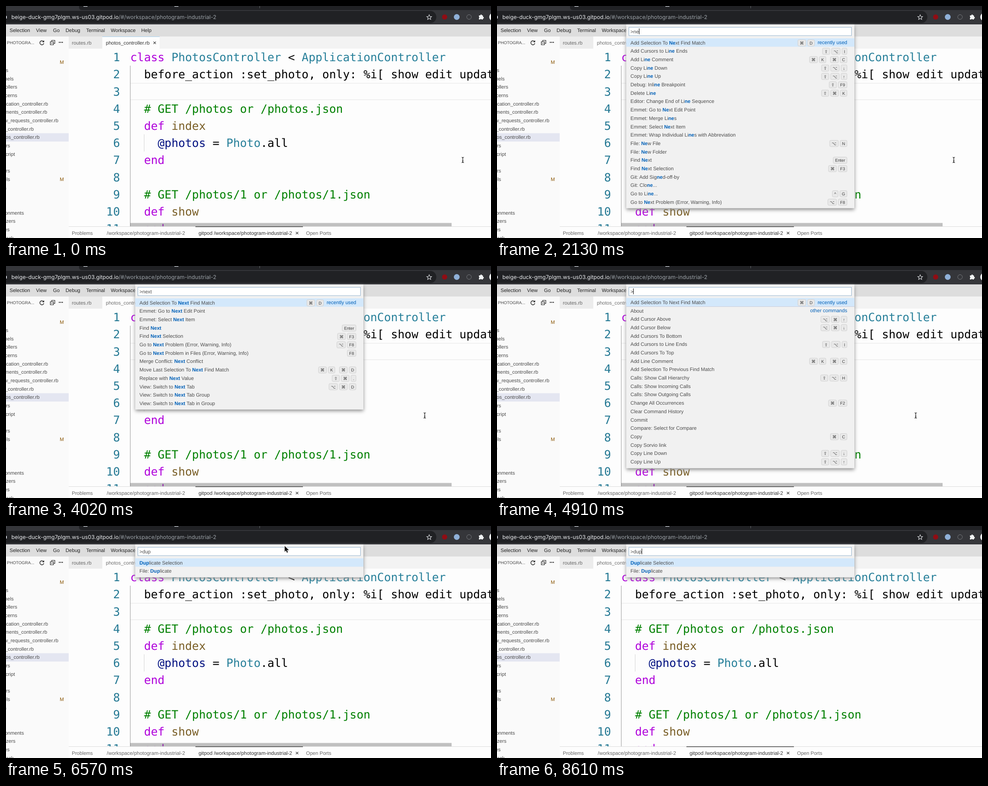
An HTML page with a canvas that plays this animation: 1083x517 px, repeating every 8.85 s.

```html
<!DOCTYPE html>
<html lang="en">
<head>
<meta charset="utf-8">
<title>Command palette</title>
<style>
html, body { margin: 0; width: 100%; height: 100%; overflow: hidden; background: #fcfcfc; }
canvas { display: block; }
</style>
</head>
<body>
<canvas id="stage" width="1083" height="517"></canvas>
<script>
const ctx = document.getElementById('stage').getContext('2d');
const LOOP = 8850, ROW = 18.68, LINE = 38.2, SIZE = 11.12;
const SANS = '"Liberation Sans", Arial, sans-serif';
const KEYS = '"Liberation Sans", "DejaVu Sans", sans-serif';
const MONO = '25.44px "DejaVu Sans Mono", monospace';
const INK = '#4c4c4c', LINK = '#0060b8';
ctx.textRendering = 'geometricPrecision';

// label | shortcut; the first one was used recently
const commands = `Add Selection To Next Find Match|⌘ D
About
Add Cursor Above|⌥ ⌘ ↑
Add Cursor Below|⌥ ⌘ ↓
Add Cursors To Bottom
Add Cursors to Line Ends|⇧ ⌥ I
Add Cursors To Top
Add Line Comment|⌘ K  ⌘ C
Add Selection To Previous Find Match
Calls: Show Call Hierarchy|⇧ ⌥ H
Calls: Show Incoming Calls
Calls: Show Outgoing Calls
Change All Occurrences|⌘ F2
Clear Command History
Commit
Compare: Select for Compare
Copy|⌘ C
Copy Sorvio link
Copy Line Down|⇧ ⌥ ↓
Copy Line Up|⇧ ⌥ ↑
Debug: Inline Breakpoint|⇧ F9
Delete Line|⇧ ⌘ K
Duplicate Selection
Editor: Change End of Line Sequence
Emmet: Go to Next Edit Point
Emmet: Merge Lines
Emmet: Select Next Item
Emmet: Wrap Individual Lines with Abbreviation
File: Duplicate
File: New File|⌥ N
File: New Folder
Find Next|Enter
Find Next Selection|⌘ F3
Git: Add Signed-off-by
Git: Clone...
Go to Line...|^ G
Go to Next Problem (Error, Warning, Info)|⌥ F8
Go to Next Problem in Files (Error, Warning, Info)|F8
Merge Conflict: Next Conflict
Move Last Selection To Next Find Match|⌘ K  ⌘ D
Python: Clear Module Analysis Cache
Replace with Next Value|⇧ ⌘ .
View: Switch to Next Tab|⌥ ⌘ D
View: Switch to Next Tab Group
View: Switch to Next Tab in Group`.split('\n').map(s => s.split('|'));

const BLACK = '#000', WORD = '#af00db', TYPE = '#267f99', NOTE = '#008000', NAME = '#795e26', FIELD = '#001080';
const code = [
  [WORD, 'class ', TYPE, 'PhotosController', BLACK, ' < ', TYPE, 'ApplicationController'],
  [BLACK, '  before_action :set_photo, only: %i[ show edit update destroy ]'],
  [],
  [NOTE, '  # GET /photos or /photos.json'],
  [WORD, '  def ', NAME, 'index'],
  [FIELD, '    @photos', BLACK, ' = ', TYPE, 'Photo', BLACK, '.all'],
  [WORD, '  end'],
  [],
  [NOTE, '  # GET /photos/1 or /photos/1.json'],
  [WORD, '  def ', NAME, 'show'],
  [WORD, '  end']
];

// file names with the x where each one ends, one per tree row
const tree = [['assets', 5], ['channels', 17], ['controllers', 25], ['concerns', 25],
  ['application_controller.rb', 94], ['comments_controller.rb', 92], ['follow_requests_controller.rb', 117],
  ['likes_controller.rb', 62], ['photos_controller.rb', 75], ['helpers', 9], ['javascript', 20], , ['mailers', 9],
  ['models', 9], ['views', 1], , , ['environments', 40], ['initializers', 21], ['locales', 8], ['webpack', 17]];

// time, typed query, caret visible
const typing = [[720, '', 1], [1140, '', 0], [1680, '', 1], [2040, 'n', 1], [2130, 'ne', 1], [2310, 'nex', 1],
  [2490, 'next', 1], [2990, 'next', 0], [3520, 'next', 1], [4020, 'next', 0], [4380, 'nex', 1], [4470, 'ne', 1],
  [4650, 'n', 1], [4910, '', 1], [5000, 'd', 1], [5500, 'd', 0], [5590, 'du', 1], [5680, 'dup', 1],
  [6210, 'dup', 0], [6710, 'dup', 1], [7210, 'dup', 0], [7710, 'dup', 1], [8210, 'dup', 0], [8610, 'dup', 1]];

// time, x, y
const mousePath = [[0, 1020, 343], [3560, 1020, 343], [3930, 935, 333], [6210, 935, 333], [6300, 835, 228],
  [6450, 715, 105], [6600, 600, 30], [6800, 480, 58], [7040, 386, 117], [7300, 354, 96], [7440, 354, 96],
  [7480, 389, 87], [7660, 389, 87], [7900, 985, 466], [7920, 1100, 540], [8350, 1100, 540],
  [8360, 1075, 515], [8430, 1075, 515], [8440, 1100, 540], [LOOP, 1100, 540]];

function rect(x, y, w, h, color) {
  ctx.fillStyle = color;
  ctx.fillRect(x, y, w, h);
}
function roundRect(x, y, w, h, r, fill, line) {
  ctx.beginPath();
  ctx.roundRect(x, y, w, h, r);
  ctx.fillStyle = fill;
  ctx.fill();
  if (line) stroke(line);
}
function stroke(color, width = 1) {
  ctx.strokeStyle = color;
  ctx.lineWidth = width;
  ctx.stroke();
}
function path(d, x, y, fill, line, width = 1) {
  const shape = new Path2D(d);
  ctx.save();
  ctx.translate(x, y);
  ctx.lineWidth = width;
  ctx.strokeStyle = line;
  ctx.fillStyle = fill;
  if (line) ctx.stroke(shape);
  if (fill) ctx.fill(shape);
  ctx.restore();
}
function circle(x, y, r, fill, line) {
  ctx.beginPath();
  ctx.arc(x, y, r, 0, 7);
  if (fill) { ctx.fillStyle = fill; ctx.fill(); }
  if (line) stroke(line);
}
// y is the middle of the line; returns the end x
function text(s, x, y, color, font = `${SIZE}px ${SANS}`, align = 'left') {
  ctx.font = font;
  ctx.textAlign = align;
  ctx.fillStyle = color;
  ctx.fillText(s, x, y + 4);
  return x + ctx.measureText(s).width;
}

function drawBrowser() {
  rect(0, 0, 1083, 41, '#35363a');
  roundRect(163, -10, 940, 19, 6, '#202124');
  rect(566, 0, 1, 5, '#5f6368');
  for (const x of [178, 381]) rect(x - 5, 0, 9, 1.5, '#bdc1c6');
  roundRect(-30, 11, 991, 27, 13.5, '#202124');
  roundRect(-4, 22, 6, 6, 1, '#bdc1c6');
  const font = '12.2px Inter, sans-serif';
  const x = text('beige-duck-gmg7plgm.ws-us03.gitpod.io', 12, 24.5, '#e8eaed', font);
  text('/#/workspace/photogram-industrial-2', x, 24.5, '#9aa0a6', font);
  path('M0-5.5 1.6-1.8 5.5-1.6 2.5 1 3.5 5 0 2.8-3.5 5-2.5 1-5.5-1.6-1.6-1.8Z', 945, 25, null, '#dadce0', 1.1);
  circle(979.5, 24.5, 5.8, '#8f0d14');
  circle(1006.5, 24.5, 6.5, '#8fb0d8');
  circle(1034, 24.5, 5.2, null, '#77797d');
  path('M-5-3H-2A2 2 0 1 1 2-3H4V0A2 2 0 1 1 4 4V6H1A1.7 1.7 0 0 0-2 6H-5V3A1.7 1.7 0 0 0-5 0Z', 1061, 24, '#f1f3f4');
  circle(1088, 24.5, 9, '#f1f3f4');
}

function drawMenu() {
  rect(0, 41, 1083, 27, '#dddddd');
  [['Selection', 8], ['View', 67], ['Go', 105], ['Debug', 133], ['Terminal', 179], ['Workspace', 234], ['Help', 302]]
    .forEach(([s, x]) => text(s, x, 54, '#222'));
}

function drawSidebar() {
  rect(0, 68, 140, 449, '#fafafa');
  text('PHOTOGRA...', 2, 81, '#444', `9.35px ${SANS}`);
  path('M3.5-3A4.5 4.5 0 1 0 4.5 1M4.5-5V-2H1.5', 80, 82, null, '#222', 1.4);
  path('M-2-2V-5H5V2H2M-5-2H2V5H-5ZM-3.5 1.5H.5', 104, 81.5, null, '#222', 1.2);
  for (const x of [119, 122.5, 126]) circle(x, 81, 1.2, '#222');
  rect(0, 283.5, 140, 18.6, '#e4e6f1');
  tree.forEach(([s, x], i) => text(s, x, 143 + i * ROW, INK, undefined, 'right'));
  for (const y of [124.5, 385.5]) text('M', 120, y, '#895503');
}

function drawEditor(t, focused) {
  rect(140, 68, 943, 449, '#fdfdfd');
  rect(140, 68, 943, 27, '#f3f3f3');
  rect(140, 68, 75, 27, '#ececec');
  rect(215, 68, 128, 27, '#fdfdfd');
  if (focused) rect(215, 68, 128, 1, '#a9d3f3');
  text('routes.rb', 147, 81.5, '#666');
  text('photos_controller.rb', 223, 82, focused ? '#333' : '#707070');
  path('M-2.7-2.7 2.7 2.7M2.7-2.7-2.7 2.7', 332, 82, null, '#333', 1.2);

  ctx.save();
  ctx.beginPath();
  ctx.rect(140, 95, 943, 396);
  ctx.clip();
  for (const y of [171.4, 208]) rect(278, y, 805, 1.7, '#eeeeee');
  rect(277, 133, 1, 358, '#9a9a9a');
  rect(308, 286, 1, LINE, '#d3d3d3');
  code.forEach((parts, i) => {
    const y = 119.2 + i * LINE;
    text(i + 1, 254.5, y, '#237893', MONO, 'right');
    for (let k = 0, x = 277.5; k < parts.length; k += 2) x = text(parts[k + 1], x, y, parts[k], MONO);
  });
  if (t >= 450 && focused) rect(277, 171, 2, 39, BLACK);
  const alpha = t < 7040 ? .4 : t < 7680 ? .3 : t < 8210 ? .4 : 0;
  rect(277, 483.5, 718, 8, `rgba(100,100,100,${alpha})`);
  ctx.restore();

  rect(140, 491, 943, 1, '#dcdcdc');
  rect(423, 491, 240, 1.5, '#424242');
  text('Problems', 147, 505.5, '#666');
  text('/workspace/photogram-industrial-2', 225, 505.5, '#666', `11.4px ${SANS}`);
  text('gitpod /workspace/photogram-industrial-2', 430, 505.5, '#333', `11.4px ${SANS}`);
  path('M-2.7-2.7 2.7 2.7M2.7-2.7-2.7 2.7', 650, 506, null, '#333', 1.2);
  text('Open Ports', 670, 505.5, '#666');
}

// key caps run leftwards from their right edge; an empty key separates chords
function drawKeys(shortcut, right, y) {
  const font = `9.35px ${KEYS}`;
  for (const key of shortcut.split(' ').reverse()) {
    if (!key) { right -= 6; continue; }
    ctx.font = font;
    const w = ctx.measureText(key).width + 9.5;
    roundRect(right - w + .5, y - 6.5, w - 1, 14, 2.5, '#e9e9e9', '#d0d0d0');
    text(key, right - w / 2, y + .2, '#3a3a3a', font, 'center');
    right -= w + 3;
  }
}

function drawPalette(t, query, caret) {
  const rows = commands.filter(c => c[0].toLowerCase().includes(query)).slice(0, 20);
  const selected = t >= 2990 && t < 3350 ? 1 : 0;
  const shift = query ? 0 : -.7;
  ctx.save();
  ctx.shadowColor = '#8c8c8c';
  ctx.shadowBlur = 8;
  ctx.shadowOffsetY = 3;
  rect(288.5, 42, 509.5, 35 + rows.length * ROW, '#f1f1f1');
  ctx.restore();
  rect(288.5, 41, 509.5, 3, '#f1f1f1');
  rect(294, 47, 498, 19.5, '#94b3cf');
  rect(295, 48, 496, 17.5, '#fff');
  const end = text('>' + query, 298, 56.5, INK);
  if (caret) rect(Math.round(end), 50, 1, 13, BLACK);

  rows.forEach(([label, shortcut], i) => {
    const top = 72 + shift + i * ROW, y = top + 9.7;
    if (i === selected) rect(288.5, top, 509.5, ROW, '#d3e8fb');
    const group = label === commands[0][0] ? 'recently used' : !query && i === 1 ? 'other commands' : '';
    if (!query && i === 1) rect(288.5, top, 509.5, 1, '#cccedb');
    const at = label.toLowerCase().indexOf(query), stop = at + query.length;
    let x = text(label.slice(0, at), 298, y, INK);
    if (query) x = text(label.slice(at, stop), x, y, LINK, `bold ${SIZE}px ${SANS}`);
    text(label.slice(stop), x, y, INK);
    let right = 782;
    if (group) {
      text(group, right, y - .3, LINK, undefined, 'right');
      right -= ctx.measureText(group).width + 6.5;
    }
    if (shortcut) drawKeys(shortcut, right, y);
  });
  if (t >= 5000 && t < 5360) rect(789.5, 72, 8.5, 18.5, 'rgba(100,100,100,.3)');
}

function drawMouse(t, paletteOpen) {
  const i = mousePath.findIndex(p => p[0] > t);
  const [t0, x0, y0] = mousePath[i - 1], [t1, x1, y1] = mousePath[i];
  const k = (t - t0) / (t1 - t0);
  const x = x0 + (x1 - x0) * k, y = y0 + (y1 - y0) * k;
  const overList = paletteOpen && x > 288 && x < 798 && y > 70 && y < 114;
  const overInput = paletteOpen && x > 294 && x < 791 && y > 47 && y < 66;
  if (overList) {
    path('M-2-6Q-.5-8 .8-6L1.2-2 6 0Q7 1 6.5 4L5 7H-1L-5 2Q-5-.5-2.5 1.5Z', x, y, '#fff', '#111', 2);
    path('M1.5 0V2M3.8 .5V2.3', x, y, null, '#111', .8);
  } else if (overInput || (y > 95 && y < 491)) {
    const beam = 'M-2.5-6Q0-6 0-4Q0-6 2.5-6M0-4V4M-2.5 6Q0 6 0 4Q0 6 2.5 6M-1.5 2H1.5';
    path(beam, x, y, null, '#fff', 2.6);
    path(beam, x, y, null, '#111', 1.2);
  } else {
    path('M0 0V13L3 10 5 15 7.3 14 5.2 9.3H9.5Z', x, y, '#111', '#fff', 2);
  }
}

function frame(now) {
  const t = now % LOOP;
  const state = typing.findLast(s => s[0] <= t);
  drawEditor(t, !state);
  drawSidebar();
  drawBrowser();
  drawMenu();
  if (state) drawPalette(t, state[1], state[2]);
  drawMouse(t, !!state);
  requestAnimationFrame(frame);
}
requestAnimationFrame(frame);
</script>
</body>
</html>
```
